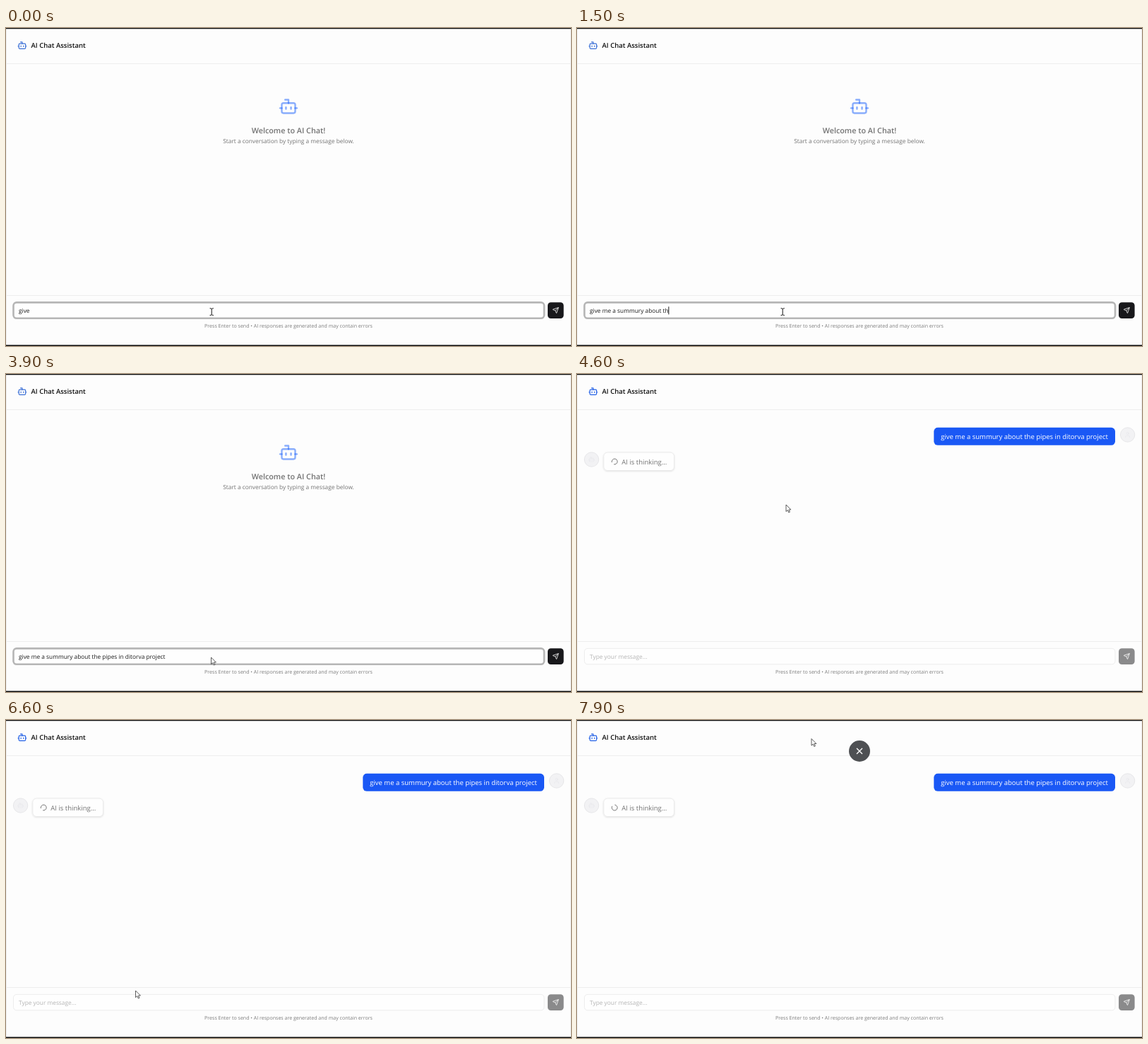
These frames come from a looping animation (800x450 px, 8 s). An HTML page:

```html
<!DOCTYPE html>
<html lang="en">
<head>
<meta charset="utf-8">
<title>AI Chat Assistant</title>
<style>
  html, body { margin: 0; width: 100%; height: 100%; overflow: hidden; background: #fdfdfd; }
  svg { display: block; font-family: "Open Sans", "Noto Sans", sans-serif; text-rendering: geometricPrecision; }
  text { white-space: pre; }
  .icon { fill: none; stroke-width: 2; stroke-linecap: round; stroke-linejoin: round; }
  .base { font-size: 9.5px; }
  .small { font-size: 8.33px; }
  .bold { font-weight: 600; }
  .mid { text-anchor: middle; }
</style>
</head>
<body>
<svg width="800" height="450" viewBox="0 0 800 450">
  <defs>
    <g id="bot" class="icon">
      <path d="M12 8V4H8"/><rect x="4" y="8" width="16" height="12" rx="2"/>
      <path d="M2 14h2"/><path d="M20 14h2"/><path d="M15 13v2"/><path d="M9 13v2"/>
    </g>
    <filter id="shadow" x="-10%" y="-20%" width="120%" height="150%">
      <feDropShadow dx="0" dy="0.8" stdDeviation="0.8" flood-opacity="0.13"/>
    </filter>
  </defs>

  <rect width="800" height="450" fill="#fdfdfd"/>
  <path d="M.5 0V450M799.5 0V450M0 50.5H800M0 378.5H800" stroke="#eeeeee"/>
  <path d="M0 .6H800M0 449.3H800" stroke="#0a0a0a" stroke-width="1.4"/>

  <use id="logo" href="#bot" transform="translate(15.8 17.4) scale(.595)"/>
  <text class="base bold" x="35.5" y="28" fill="#111">AI Chat Assistant</text>

  <g id="welcome">
    <use href="#bot" transform="translate(385.7 96.7) scale(1.19)" stroke="rgba(21,93,252,.5)"/>
    <g class="mid" fill="#737373">
      <text class="bold" x="400" y="149" font-size="10.8">Welcome to AI Chat!</text>
      <text class="small" x="400" y="163.3">Start a conversation by typing a message below.</text>
    </g>
  </g>

  <g id="chat">
    <rect x="505.3" y="75.8" width="256.7" height="25" rx="5.5" fill="#1a58f5"/>
    <text class="base" x="515.2" y="92.3" fill="#fff" id="sent"></text>
    <g fill="#f2f2f4" stroke="#e2e2e5" stroke-width=".8">
      <circle cx="779.6" cy="86" r="10.2"/><circle cx="20.6" cy="121" r="10.2"/>
    </g>
    <use href="#bot" transform="translate(15.8 116) scale(.4)" stroke="#e9e9ec"/>
    <g class="icon" stroke="#e9e9ec" transform="translate(774.8 81.2) scale(.4)">
      <path d="M19 21v-2a4 4 0 0 0-4-4H9a4 4 0 0 0-4 4v2"/><circle cx="12" cy="7" r="4"/>
    </g>
    <rect x="37.8" y="111" width="99.8" height="25.6" rx="5.5" fill="#fefefe" stroke="#e6e6e6" stroke-width=".8" filter="url(#shadow)"/>
    <path id="spinner" class="icon" stroke="#6b6b6b" d="M21 12a9 9 0 1 1-6.219-8.56"/>
    <text class="base" x="63.3" y="127.7" fill="#737373">AI is thinking...</text>
  </g>

  <rect id="field" x="10.5" y="388.4" width="751.5" height="22.4" rx="4.5" fill="#fefefe"/>
  <text id="entry" class="small" x="18" y="403"></text>
  <path id="caret" stroke="#000" stroke-width=".9"/>
  <rect id="button" x="767" y="388.2" width="22.6" height="22.8" rx="4.5"/>
  <g class="icon" stroke="#fff" transform="translate(773.5 394.8) scale(.396)">
    <path d="M14.536 21.686a.5.5 0 0 0 .937-.024l6.5-19a.496.496 0 0 0-.635-.635l-19 6.5a.5.5 0 0 0-.024.937l7.93 3.18a2 2 0 0 1 1.112 1.11z"/>
    <path d="m21.854 2.147-10.94 10.939"/>
  </g>
  <text class="mid" x="400" y="423.8" font-size="7.06" fill="#7c7c7c">Press Enter to send • AI responses are generated and may contain errors</text>

  <g id="close">
    <circle r="15" fill="#4e5053"/>
    <path d="M-4-4 4 4M4-4-4 4" stroke="#fff" stroke-width="1.4"/>
  </g>
  <path id="beam" d="M288.6 396.7q2 0 2.6 .8q.6-.8 2.6-.8M291.2 397.5V405.7M288.6 406.5q2 0 2.6-.8q.6 .8 2.6 .8" fill="none" stroke="#111"/>
  <path id="arrow" d="M0 0V9.6L2.3 7.6 3.8 11 5.4 10.3 3.9 7H6.9Z" fill="#fff" stroke="#333" stroke-width=".8" stroke-linejoin="round"/>
</svg>
<script>
const LOOP = 8000, STEP = 100, SEND = 4000, ARROW = 3700;
const message = 'give me a summury about the pipes in ditorva project';
const $ = id => document.getElementById(id);

// Each key is [time, value, ...]
const typed = [[0, 4], [1500, 26], [1700, 27], [1800, 27], [2500, 38], [2600, 38],
  [2900, 42], [3000, 45], [3100, 45], [3500, 52]];
const pointer = [[4000, 290.5, 401], [4600, 296, 185], [5000, 236, 300], [5400, 183.5, 383],
  [6600, 183.5, 383], [7200, 272, 238], [7600, 333, 3], [7900, 332, 26.5]];
const closeY = [[7200, -16], [7700, 44]];

function sample(keys, t) {
  const next = keys.findIndex(k => k[0] > t);
  if (next < 0) return keys.at(-1).slice(1);
  if (next === 0) return keys[0].slice(1);
  const a = keys[next - 1], b = keys[next];
  const p = (t - a[0]) / (b[0] - a[0]);
  return a.slice(1).map((v, i) => v + (b[i + 1] - v) * p);
}

const show = (id, on) => $(id).setAttribute('visibility', on ? 'visible' : 'hidden');
const attrs = (id, values) => {
  for (const name in values) $(id).setAttribute(name, values[name]);
};

function draw(t) {
  const sent = t >= SEND;
  show('welcome', !sent);
  show('chat', sent);
  attrs('logo', { stroke: sent ? '#2260e6' : '#3a6fd6' });
  attrs('field', { stroke: sent ? '#ededed' : '#b6b6b6', 'stroke-width': sent ? 1 : 2.6 });
  attrs('button', { fill: sent ? '#8a8a8b' : '#18181b' });

  const count = Math.floor(sample(typed, t)[0] + 1e-6);
  $('entry').textContent = sent ? 'Type your message...' : message.slice(0, count);
  attrs('entry', { fill: sent ? '#b4b4b4' : '#1a1a1a' });
  const x = 18.3 + $('entry').getComputedTextLength();
  attrs('caret', { d: `M${x} 394.3V405.3` });
  show('caret', t >= STEP && t < ARROW);

  const angle = 171 + (t - 4600) * .36;
  attrs('spinner', { transform: `translate(53.2 124) rotate(${angle}) scale(.44) translate(-12 -12)` });

  show('beam', t < ARROW);
  show('arrow', t >= ARROW);
  attrs('arrow', { transform: `translate(${sample(pointer, t)})` });
  attrs('close', { transform: `translate(400 ${sample(closeY, t)})` });
}

$('sent').textContent = message;
const start = performance.now();
function tick() {
  const t = (performance.now() - start) % LOOP;
  draw(Math.floor(t / STEP) * STEP);
  requestAnimationFrame(tick);
}
tick();
</script>
</body>
</html>
```
